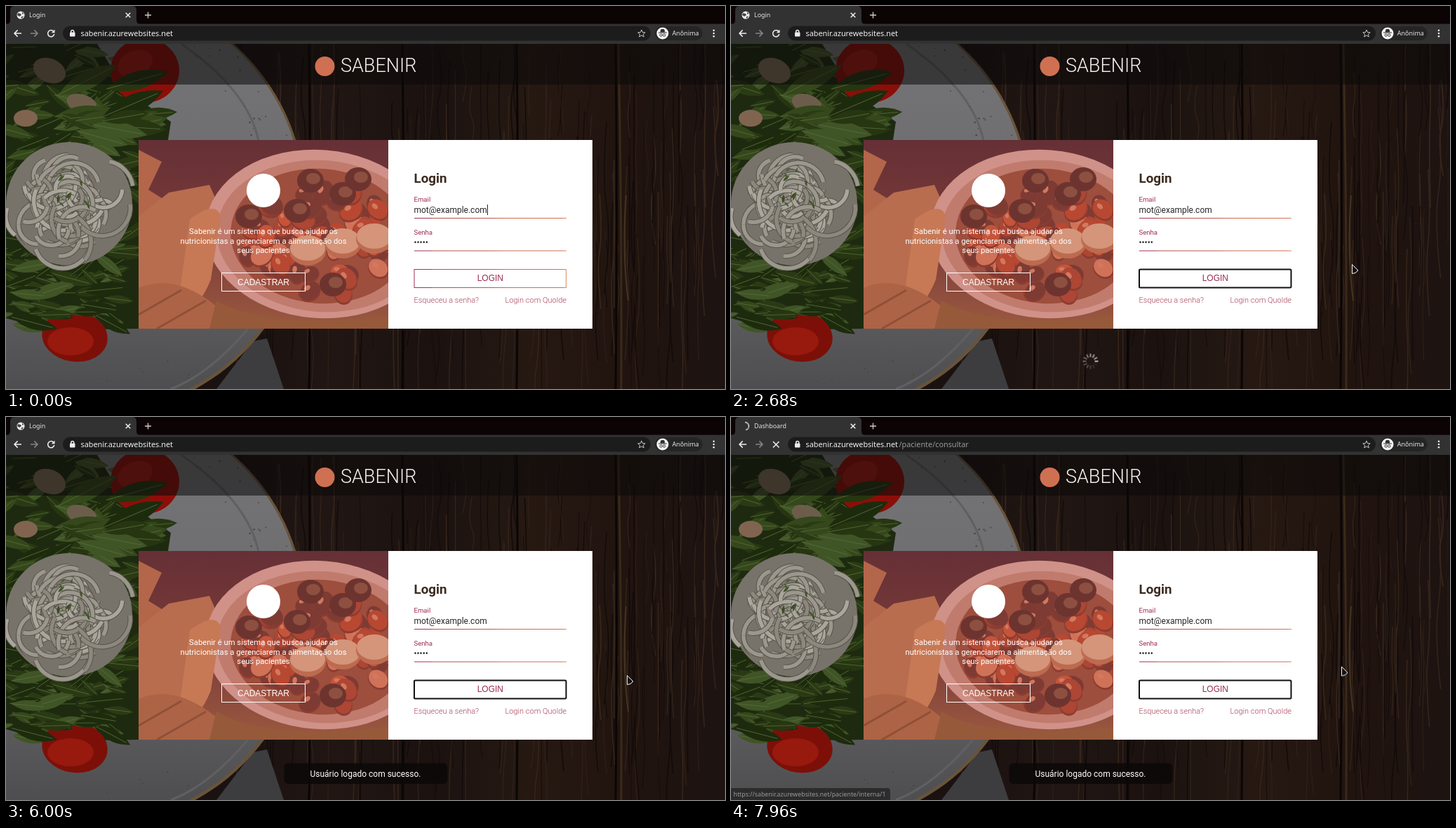
Write an HTML page with a canvas that moves like this. It is 1025 px wide and 546 px high and loops after 8 s.

```html
<!DOCTYPE html>
<html lang="pt-BR">
<head>
<meta charset="utf-8">
<title>Login</title>
<style>
html, body { margin: 0; width: 100%; height: 100%; overflow: hidden; background: #0b0304; }
canvas, svg { position: absolute; left: 0; top: 0; width: 1025px; height: 546px; display: block; }
text { font-family: Roboto, sans-serif; font-size: 12px; white-space: pre; }
.ui { font-family: "Noto Sans", sans-serif; font-size: 8.9px; fill: #e4e4e4; }
.url { font-size: 10.85px; fill: #f1f1f1; }
.dim { fill: #9a9a9a; }
.btn { font-family: "Liberation Sans", Arial, sans-serif; text-anchor: middle; }
.label { font-size: 9.6px; fill: #9c2a50; }
.link { font-size: 11px; font-weight: 300; fill: #a8405a; }
.intro { font-size: 11.25px; fill: #fff; text-anchor: middle; }
.icon { fill: none; stroke: #f0f0f0; stroke-width: 1.5; }

.caret, .hand, .arrow, .hover, .ring, .pre, .post, .wait, .done, .early { animation: 8s step-end infinite; }
.caret { animation-name: caret; }
.hand { animation-name: hand; }
.arrow { animation-name: arrow; }
.hover { animation-name: hover; }
.ring { animation-name: ring; }
.pre { animation-name: pre; }
.post { animation-name: post; }
.wait { animation-name: wait; }
.done { animation-name: done; }
.cursor { animation: move 8s linear infinite; }
.word { animation: word 8s linear infinite; }
.loader { animation: loader 8s linear infinite; }
.toast { animation: toast 8s ease-out infinite; }
.ray { animation: ray 1s linear infinite; }
.throb { fill: none; stroke: #f2f2f2; stroke-width: 1.4; transform-origin: 21px 13px; }
.wait .throb { animation: spin 1.33333s linear infinite reverse; }
.done .throb { animation: spin 1.6s linear infinite; }

@keyframes caret { 0% { opacity: 1 } 3.375% { opacity: 0 } 11.25% { opacity: 1 } 18.5%, to { opacity: 0 } }
@keyframes hand { 0% { opacity: 0 } 20.6% { opacity: 1 } 28.4%, to { opacity: 0 } }
@keyframes arrow { 0% { opacity: 0 } 28.4%, to { opacity: 1 } }
@keyframes hover { 0% { opacity: 0 } 20.6% { opacity: 1 } 29.4%, to { opacity: 0 } }
@keyframes ring { 0% { opacity: 0 } 26.9%, to { opacity: 1 } }
@keyframes pre { 0% { opacity: 1 } 76.9%, to { opacity: 0 } }
@keyframes post { 0% { opacity: 0 } 76.9%, to { opacity: 1 } }
@keyframes wait { 0% { opacity: 0 } 76.9% { opacity: 1 } 95.6%, to { opacity: 0 } }
@keyframes done { 0% { opacity: 0 } 95.6%, to { opacity: 1 } }
@keyframes move {
  0%, 27.5% { transform: translate(739px, 385px) }
  28.4% { transform: translate(775px, 382px) }
  29.125% { transform: translate(817px, 379px) }
  30.375% { transform: translate(875px, 371px) }
  32.5%, 78.75% { transform: translate(885px, 368px) }
  80.25% { transform: translate(883px, 368px) }
  83.375% { transform: translate(871px, 359px) }
  88.75%, to { transform: translate(870px, 355.5px) }
}
@keyframes word {
  0%, 20.6% { fill: #9a2b50 }
  24.4%, 29.4% { fill: #fff }
  33.1%, to { fill: #9a2b50 }
}
@keyframes loader { 0%, 28.1% { opacity: 0 } 31%, 69.7% { opacity: 1 } 71.3%, to { opacity: 0 } }
@keyframes toast { 0%, 70.6% { opacity: 0 } 73.75%, to { opacity: 1 } }
@keyframes ray { from { opacity: 1 } to { opacity: .08 } }
@keyframes spin { to { transform: rotate(360deg) } }
</style>
</head>
<body>
<canvas id="photo" width="1025" height="546"></canvas>
<svg id="page" viewBox="0 0 1025 546">
  <defs>
    <linearGradient id="brand" gradientUnits="userSpaceOnUse" x1="582" x2="799" y1="0" y2="0">
      <stop offset="0" stop-color="#a23057"/><stop offset=".11" stop-color="#a43256"/>
      <stop offset=".125" stop-color="#ae514a"/><stop offset=".5" stop-color="#b9574a"/>
      <stop offset=".6" stop-color="#cc6b50"/><stop offset=".97" stop-color="#cf6f53"/>
      <stop offset="1" stop-color="#d68f68"/>
    </linearGradient>
    <linearGradient id="fade" gradientUnits="userSpaceOnUse" x1="148" x2="166" y1="0" y2="0">
      <stop offset="0" stop-color="#323232" stop-opacity="0"/><stop offset="1" stop-color="#323232"/>
    </linearGradient>
  </defs>

  <!-- Browser bar -->
  <rect width="1025" height="26" fill="#0b0304"/>
  <path d="M0 26Q6 26 6 20V6Q6 0 12 0H180Q186 0 186 6V20Q186 26 192 26Z" fill="#323232"/>
  <rect y="25.500" width="1025" height="28.500" fill="#323232"/>
  <rect x="81" y="28.500" width="838" height="21" rx="10.500" fill="#1c1c1c"/>
  <rect x="925" y="29" width="68" height="20" rx="10" fill="#252525"/>
  <path class="icon" d="M170.700 9.700l6.600 6.600m0-6.600l-6.600 6.600" stroke-width="1.200"/>
  <path d="M198 13h9m-4.500-4.500v9" stroke="#d6c8c8" stroke-width="1.300"/>
  <path class="icon" d="M22 39H12m4.600-4.600L12 39l4.600 4.600"/>
  <path class="icon" d="M35 39h10m-4.600-4.600L45 39l-4.600 4.600" style="stroke:#868686"/>
  <g class="pre">
    <path class="icon" d="M68 36.500A4.600 4.600 0 1 0 68.800 40"/>
    <path d="M69.500 33.500v4.700h-4.700z" fill="#f0f0f0"/>
    <circle cx="21" cy="13" r="5.500" fill="#f2f2f2"/>
    <path d="M17 10l4 1 1 2-3 2-3-2zM22.500 8l3 3-2 1zM21 16l4-2-2 4z" fill="#454545"/>
    <text class="ui" x="33" y="16">Login</text>
  </g>
  <g class="post">
    <path class="icon" d="M60 35l8.500 8.500m0-8.500L60 43.500"/>
    <text class="ui url dim" x="239.500" y="42.700">/paciente/consultar</text>
  </g>
  <g class="wait">
    <path class="throb" d="M15.800 11.100A5.500 5.500 0 0 0 25.200 16.500"/>
    <text class="ui" x="33" y="16">https://sabenir.azurewebsites.net</text>
    <rect x="148" y="6" width="18" height="14" fill="url(#fade)"/>
    <path d="M166 6h4v14h-4zM177.500 6h8v14h-8z" fill="#323232"/>
    <path class="icon" d="M170.700 9.700l6.600 6.600m0-6.600l-6.600 6.600" stroke-width="1.200"/>
  </g>
  <g class="done">
    <path class="throb" d="M21 7.500A5.500 5.500 0 0 1 20.200 18.400"/>
    <text class="ui" x="33" y="16">Dashboard</text>
  </g>
  <rect x="91" y="37.500" width="7.500" height="6" rx="1" fill="#ececec"/>
  <path class="icon" d="M92.700 38v-1.500a2 2 0 0 1 4 0V38" stroke-width="1.200"/>
  <text class="ui url" x="106.500" y="42.700">sabenir.azurewebsites.net</text>
  <path class="icon" d="M906 34l1.500 3.500 3.700.3-2.800 2.400.9 3.700-3.300-2-3.300 2 .9-3.700-2.800-2.400 3.700-.3z" style="stroke:#c8c8c8;stroke-width:1"/>
  <circle cx="936" cy="39" r="8.500" fill="#f3f3f3"/>
  <path d="M930 38h12M933 37l1-3.500h4l1 3.500z" fill="#303030" stroke="#303030"/>
  <g fill="none" stroke="#303030"><circle cx="933.700" cy="41.500" r="1.700"/><circle cx="938.300" cy="41.500" r="1.700"/></g>
  <text class="ui" x="949.800" y="42.200" style="font-size:9px">Anônima</text>
  <g fill="#efefef"><circle cx="1009" cy="34.700" r="1.300"/><circle cx="1009" cy="39" r="1.300"/><circle cx="1009" cy="43.300" r="1.300"/></g>

  <!-- Page header -->
  <rect y="54" width="1025" height="58" fill="#0c0a0a" fill-opacity=".55"/>
  <circle cx="454.500" cy="86" r="14" fill="#cf7052"/>
  <text x="477" y="94" style="font-size:27px;font-weight:300;fill:#fbf4f0">SABENIR</text>

  <!-- Intro panel -->
  <circle cx="367" cy="263" r="24" fill="#fff"/>
  <text class="intro" x="367" y="325">Sabenir é um sistema que busca ajudar os</text>
  <text class="intro" x="367" y="338.500">nutricionistas a gerenciarem a alimentação dos</text>
  <text class="intro" x="367" y="352">seus pacientes</text>
  <rect x="307.500" y="380.500" width="119" height="26" fill="none" stroke="#fff"/>
  <text class="btn" x="367" y="397.500" fill="#fff">CADASTRAR</text>

  <!-- Login form -->
  <rect x="545" y="191" width="291" height="269" fill="#fff"/>
  <text x="581.500" y="252" style="font-size:18.75px;font-weight:700" fill="#3d2b20">Login</text>
  <text class="label" x="581.500" y="279">Email</text>
  <text x="581.500" y="295" fill="#262626">mot@example.com</text>
  <rect class="caret" x="686" y="283" width="1" height="15" fill="#222"/>
  <rect x="582" y="302" width="217" height="1" fill="url(#brand)"/>
  <text class="label" x="581.500" y="325.500">Senha</text>
  <text x="581.500" y="341" fill="#262626">•••••</text>
  <rect x="582" y="348.500" width="217" height="1" fill="url(#brand)"/>
  <rect x="582" y="375.500" width="216.500" height="26" fill="#fff" stroke="url(#brand)"/>
  <rect class="hover" x="581.500" y="375" width="217.500" height="27" fill="url(#brand)"/>
  <rect class="ring" x="582" y="375.500" width="216.500" height="26" rx="1.500" fill="none" stroke="#111" stroke-width="2"/>
  <text class="btn word" x="690.300" y="392">LOGIN</text>
  <text class="link" x="581.500" y="422.500">Esqueceu a senha?</text>
  <text class="link" x="799" y="422.500" text-anchor="end">Login com Quolde</text>

  <g transform="translate(512.500 506.500)"><g id="loader" class="loader" stroke="#e6d9d3" stroke-width="1.800"></g></g>

  <g class="toast">
    <rect x="396.500" y="493.500" width="233" height="29.500" rx="6" fill="#0c0909" fill-opacity=".85"/>
    <text x="512.500" y="513" fill="#fff" text-anchor="middle">Usuário logado com sucesso.</text>
  </g>

  <!-- Status bubble -->
  <g class="wait">
    <path d="M0 529H336Q340 529 340 533V546H0Z" fill="#2c2c2c"/>
    <text class="ui dim" x="3.500" y="541" style="font-size:8.8px">Aguardando sabenir.azurewebsites.net...</text>
  </g>
  <g class="done">
    <path d="M0 529H223Q227 529 227 533V546H0Z" fill="#2c2c2c"/>
    <text class="ui dim" x="3.500" y="541" style="font-size:8.8px">https://sabenir.azurewebsites.net/paciente/interna/1</text>
  </g>

  <g class="cursor" fill="#111" stroke="#fff" stroke-linejoin="round">
    <path class="hand" d="M-2 .5Q0-1.500 1.500.5V5Q3 4 4 5.500 5.500 4.500 6.500 6 8.500 5.500 9 7.500V11L7.500 14.500H0L-4 9.500Q-5 7.500-3 7.500L-2 8.500Z"/>
    <path class="arrow" d="M.5.5V13.500L5 12.500 9 9Z"/>
  </g>
</svg>
<script>
const ctx = document.getElementById('photo').getContext('2d');
let seed = 7;
const rnd = (a, b) => {
  seed = (seed * 16807) % 2147483647;
  return a + (b - a) * seed / 2147483647;
};
const pick = list => list[Math.floor(rnd(0, list.length))];

function blob(color, x, y, rx, ry = rx, turn = 0) {
  ctx.fillStyle = color;
  ctx.beginPath();
  ctx.ellipse(x, y, rx, ry, turn, 0, 7);
  ctx.fill();
}

function shape(color, path) {
  ctx.fillStyle = color;
  ctx.fill(new Path2D(path));
}

function line(color, width, path) {
  ctx.strokeStyle = color;
  ctx.lineWidth = width;
  ctx.stroke(new Path2D(path));
}

function gradient(stops, x, y, dx, dy) {
  const g = ctx.createLinearGradient(x, y, x + dx, y + dy);
  stops.forEach((c, i) => g.addColorStop(i / (stops.length - 1), c));
  return g;
}

function wood() {
  ctx.fillStyle = gradient(['#1a1210', '#211613', '#1b1210', '#261912', '#21140f', '#1d1311'], 330, 0, 695, 0);
  ctx.fillRect(0, 54, 1025, 492);
  for (let i = 0; i < 210; i++) {
    const x = rnd(330, 1025), y = rnd(30, 400), h = rnd(80, 300), w = rnd(-7, 7);
    line(pick(['#2f2119', '#120b0a', '#35251b', '#150d0b']), rnd(.6, 2),
      `M${x} ${y}q${w} ${h / 3} 0 ${h / 2}t${w / 2} ${h / 2}`);
  }
  for (const x of [432, 565, 728, 869]) line('#0a0606', 3, `M${x} 54q3 240 0 492`);
  line('#3a2a1a', 3, 'M873 54q5 240 4 492');
  line('#46331f', 2, 'M884 270q-6 80 3 150');
}

function leaf(x, y, len, a) {
  ctx.save();
  ctx.translate(x, y);
  ctx.rotate(a);
  const w = len * .28;
  shape(pick(['#1d2b0d', '#2a3b14', '#34481b', '#405526', '#263611']), `M0 0Q${len / 2} ${-w} ${len} 0Q${len / 2} ${w} 0 0`);
  line('#5a6b3d', .8, `M0 0H${len * .9}`);
  ctx.restore();
}

function salad() {
  shape('#3d3d40', 'M300 546L352 478 372 474 396 546Z');
  blob('#68543a', 125, 281, 302);
  ctx.fillStyle = gradient(['#747477', '#6c6c6e', '#4e4e50'], 0, 54, 0, 492);
  ctx.beginPath();
  ctx.arc(124, 280, 299, 0, 7);
  ctx.fill();
  line('#606063', 3, 'M250 54Q345 120 360 192M345 460Q290 525 235 546');
  for (let i = 0; i < 70; i++) {
    const a = rnd(-1, 1.6), r = rnd(245, 296);
    blob('#54432f', 124 + r * Math.cos(a), 280 + r * Math.sin(a), rnd(.4, 1.3));
  }
  shape('#1e2a10', 'M0 54H130L170 120 235 165 190 460 60 462 0 445Z');
  for (let i = 0; i < 170; i++) {
    const y = rnd(56, 455);
    leaf(rnd(-30, 185 - Math.max(0, Math.abs(y - 170) - 70) * .2), y, rnd(25, 65), rnd(-.9, .8));
  }
  blob('#7d6c56', 62, 92, 24, 17, .4);
  blob('#6c5d4b', 108, 139, 22, 13, .3);
  blob('#806450', 28, 160, 17, 12);
  blob('#8c0e08', 198, 92, 49, 46);
  blob('#a11a10', 184, 82, 26, 18, -.4);
  for (let i = 0; i < 16; i++) leaf(rnd(65, 150), rnd(118, 185), rnd(55, 95), rnd(-.5, .4));
  blob('#77736a', 90, 282, 90, 88);
  for (let i = 0; i < 95; i++) {
    const a = rnd(0, 6.3), d = rnd(0, 58), x = 88 + d * Math.cos(a), y = 282 + d * Math.sin(a);
    const r = rnd(14, 42), from = rnd(0, 6.3), sweep = rnd(1.2, 3);
    for (const [c, w] of [['#57534a', 7.5], [pick(['#9b978d', '#aaa69c', '#8d887d']), 5.5]]) {
      ctx.strokeStyle = c;
      ctx.lineWidth = w;
      ctx.beginPath();
      ctx.arc(x, y, r, from, from + sweep);
      ctx.stroke();
    }
  }
  for (let i = 0; i < 12; i++) leaf(rnd(60, 120), rnd(225, 300), rnd(4, 13), rnd(0, 6));
  blob('#7c1008', 98, 471, 47, 36, .15);
  blob('#98190e', 92, 478, 33, 20);
  for (let i = 0; i < 14; i++) leaf(rnd(0, 125), rnd(405, 447), rnd(40, 75), rnd(-.3, .3));
}

function bowl() {
  ctx.save();
  ctx.beginPath();
  ctx.rect(189, 191, 356, 269);
  ctx.clip();
  ctx.fillStyle = gradient(['#653036', '#7a3a38', '#9b5940'], 0, 191, 0, 269);
  ctx.fillRect(189, 191, 356, 269);
  shape('#b3664a', 'M189 205L222 222 203 262 240 285 189 330Z');
  shape('#b96d4f', 'M189 300L232 266 290 255 310 300 270 440 189 460Z');
  blob('#d09189', 447, 325, 163, 120, .08);
  blob('#c07b6d', 450, 328, 150, 108, .08);
  blob('#9d4e3d', 448, 328, 128, 96, .08);
  for (let i = 0; i < 75; i++) {
    const a = rnd(0, 6.3), d = Math.sqrt(rnd(0, 1));
    const x = 450 + 112 * d * Math.cos(a), y = 332 + 80 * d * Math.sin(a), r = rnd(12, 19);
    const turn = rnd(0, 3), c = pick(['#b84832', '#c5543a', '#ad4634', '#d07258', '#7d3b34']);
    blob('#8b3c30', x, y + 2, r, r * .8, turn);
    blob(c, x, y, r - 1, r * .75, turn);
    blob('#d2795f', x - 4, y - 4, r * .3, r * .2, turn);
  }
  for (const [x, y] of [[434, 249], [480, 268], [415, 292], [346, 300], [502, 247], [466, 397]]) {
    blob('#6d342f', x, y, 19, 17);
    blob('#8d5040', x + 4, y - 3, 10, 8);
  }
  for (const [x, y] of [[480, 337], [430, 347], [525, 330]]) {
    blob('#bd6b50', x, y + 2, 26, 21);
    blob('#d4957a', x, y - 2, 25, 18);
  }
  shape('#c77955', 'M262 304Q300 276 306 300L292 390Q268 448 246 420Z');
  shape('#ad6345', 'M189 402Q240 380 300 428L345 460H189Z');
  line('#8f5038', 3, 'M189 440L250 405M215 460L285 420');
  shape('#965a3b', 'M300 420Q370 462 545 442V460H290Z');
  ctx.restore();
}

wood();
salad();
bowl();

const rays = document.getElementById('loader');
for (let i = 0; i < 12; i++) {
  const ray = document.createElementNS('http://www.w3.org/2000/svg', 'path');
  ray.setAttribute('d', 'M0-6V-11');
  ray.setAttribute('transform', `rotate(${i * 30})`);
  ray.setAttribute('class', 'ray');
  ray.style.animationDelay = `${i / 12 - 1.645}s`;
  rays.append(ray);
}
</script>
</body>
</html>
```
